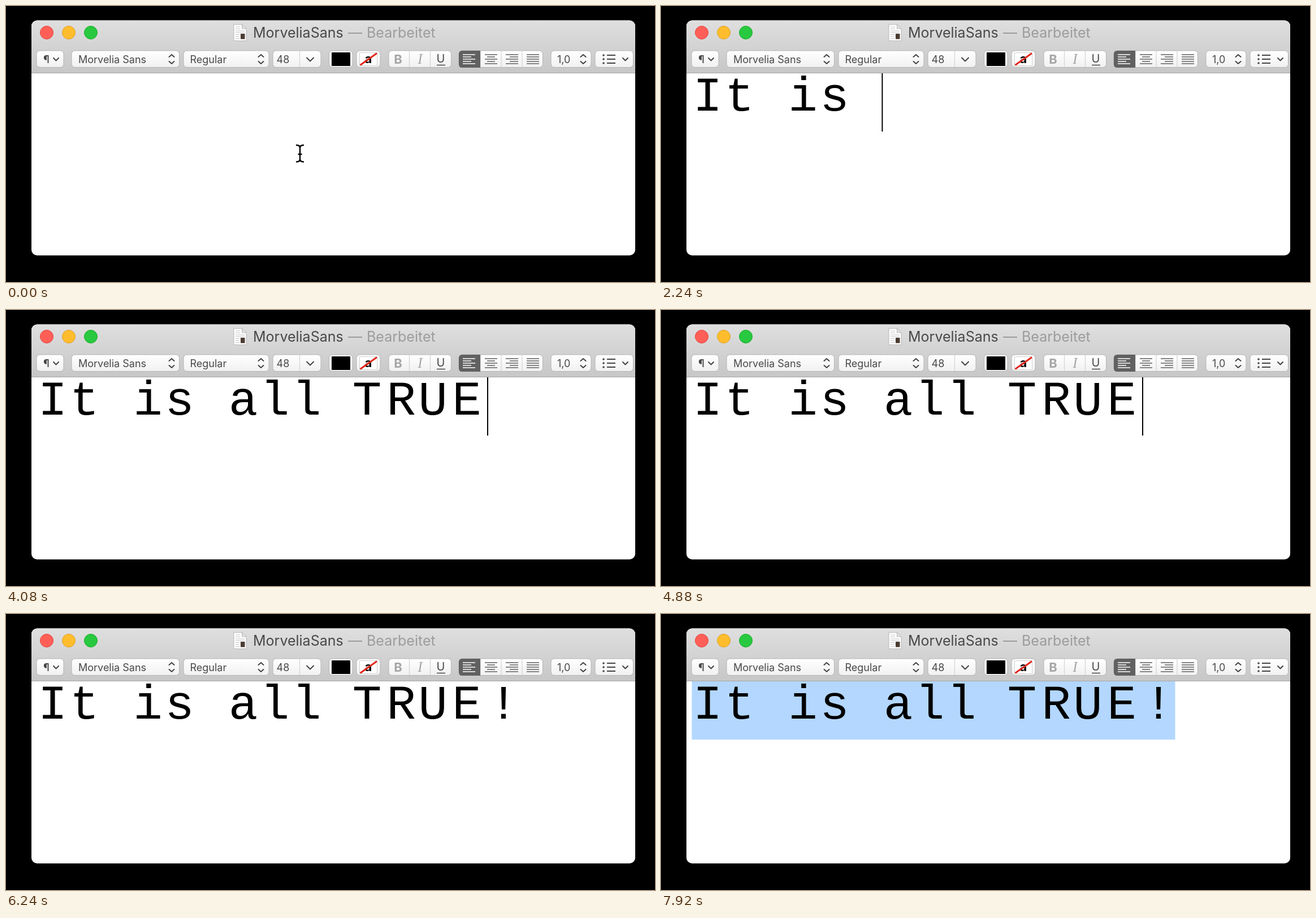
Animation of 1148x488 px, one loop 8 s. Source, as an HTML page:

```html
<!DOCTYPE html>
<html lang="de">
<head>
<meta charset="utf-8">
<title>Typing in a text editor</title>
<style>
  html, body { margin: 0; width: 100%; height: 100%; overflow: hidden; background: #000; }
  svg { display: block; width: 100%; height: 100%; }
  text { font-family: Inter, sans-serif; font-size: 18px; fill: #484848; }
  .title { font-size: 25px; }
  .line { fill: none; stroke-linecap: round; stroke-linejoin: round; stroke: #444; stroke-width: 2; }
  .divider { stroke: #d2d2d2; stroke-width: 1.2; }
  #typed text { font: 86px "Liberation Mono", monospace; text-anchor: middle; fill: #000; }
</style>
</head>
<body>
<svg viewBox="0 0 1148 488">
  <defs>
    <linearGradient id="bar" x2="0" y2="1">
      <stop stop-color="#e0dfe0"/><stop offset="1" stop-color="#c8c7c8"/>
    </linearGradient>
    <linearGradient id="face" x2="0" y2="1">
      <stop stop-color="#fff"/><stop offset="1" stop-color="#f1f1f1"/>
    </linearGradient>
    <clipPath id="window"><rect x="45" y="25.5" width="1068" height="415.5" rx="10"/></clipPath>
  </defs>

  <g clip-path="url(#window)">
    <rect x="45" y="25" width="1068" height="417" fill="#fff"/>
    <rect x="45" y="25" width="1068" height="93" fill="url(#bar)"/>
    <path d="M45 118.5H1113" stroke="#a6a6a6" stroke-width="1"/>
  </g>

  <g stroke-width="1">
    <circle cx="72" cy="47" r="11.5" fill="#ff5f57" stroke="#e2483f"/>
    <circle cx="111" cy="47" r="11.5" fill="#ffbd2e" stroke="#dfa023"/>
    <circle cx="150" cy="47" r="11.5" fill="#28c940" stroke="#1dad2b"/>
  </g>

  <path d="M403 32.5H417.5L425 40V61.5H403Z" fill="#fff" stroke="#b5b5b5"/>
  <path d="M417.5 32.5V40H425Z" fill="#e4e4e4" stroke="#b5b5b5"/>
  <path d="M406 37H414M406 40.5H414M406 44H422M406 47H422M406 50.5H413M406 54H413M406 57.5H413" stroke="#c4c4c4"/>
  <rect x="415" y="49" width="7.5" height="9.5" fill="#4c3c32"/>

  <text class="title" x="437" y="56" fill="#444">MorveliaSans</text>
  <text class="title" x="605" y="56" style="fill:#9d9b9d">—</text>
  <text class="title" x="638" y="56" style="fill:#9d9b9d">Bearbeitet</text>

  <g id="buttons"></g>

  <text x="66" y="100.5" style="font-weight:600">¶</text>
  <path class="line" d="M84 92l4.5 4.5 4.5-4.5"/>
  <text x="128" y="100.5">Morvelia Sans</text>
  <text x="325.5" y="100.5">Regular</text>
  <text x="478.5" y="100.5">48</text>
  <path class="line" d="M532 91.5l6 6 6-6"/>
  <text x="975" y="100.5">1,0</text>
  <g id="steppers"></g>

  <rect x="576" y="82" width="33" height="24"/>
  <rect x="625.5" y="82.5" width="31" height="23" fill="#fff" stroke="#d0d0d0"/>
  <text x="641" y="100.5" text-anchor="middle" style="font-size:22px;font-weight:700;fill:#000">a</text>
  <path d="M626.5 104.5L656 83.5" stroke="#e0281b" stroke-width="3"/>

  <text x="693.5" y="102" text-anchor="middle" style="font-size:22px;font-weight:700;fill:#a5a5a5">B</text>
  <text x="732.5" y="102" text-anchor="middle" style="font:italic 25px 'Liberation Serif',serif;fill:#a5a5a5">I</text>
  <text x="769" y="100" text-anchor="middle" style="font-size:20px">U</text>
  <path d="M762 104.5H777" stroke="#444" stroke-width="1.5"/>

  <g id="aligns"></g>

  <path d="M1063 87H1078M1063 94H1078M1063 101H1078" stroke="#444" stroke-width="2"/>
  <path d="M1055 87H1059M1055 94H1059M1055 101H1059M1057 85V89M1057 92V96M1057 99V103" stroke="#444" stroke-width="1.3"/>
  <path class="line" d="M1091 92l4.5 4.5 4.5-4.5"/>

  <rect id="selection" x="54.5" y="119" width="855" height="103" fill="#b3d7ff"/>
  <g id="typed"></g>
  <rect id="caret" y="119" width="2" height="103"/>
  <path id="pointer" class="line" style="stroke:#000;stroke-width:2.4"
    d="M514 246Q520 246 520 251Q520 246 526 246M520 251V271M514 275.5Q520 275.5 520 270.5Q520 275.5 526 275.5M517.5 262H522.5"/>
</svg>

<script>
const el = id => document.getElementById(id);

// Toolbar buttons: left edge, right edge, dividers
const buttons = [
  [54, 102], [116, 306.5], [314, 465], [472, 557, 519.5], [571.5, 613], [620, 662],
  [677, 787.5, 713.5, 750.5], [801, 949.5, 839, 876, 913], [964, 1035], [1042, 1109.5]
];
el('buttons').innerHTML = buttons.map(([left, right, ...dividers]) =>
  `<rect x="${left}" y="79" width="${right - left}" height="29.5" rx="6" fill="url(#face)" stroke="#b4b4b4"/>` +
  dividers.map(x => `<path class="divider" d="M${x} 79.5V108"/>`).join('')
).join('') + '<path d="M839 79H807Q801 79 801 85V103Q801 109 807 109H839Z" fill="#626162"/>';

el('steppers').innerHTML = [293, 451, 1021].map(x =>
  `<path class="line" d="M${x - 4.5} 90l4.5-4 4.5 4M${x - 4.5} 98l4.5 4 4.5-4"/>`
).join('');

// Paragraph alignment icons: centre, share of slack on the left, short line, colour
const aligns = [[819, 0, 15, '#d8d8d8'], [858, .5, 14, '#858585'], [895, 1, 15, '#858585'], [932, 0, 22, '#858585']];
el('aligns').innerHTML = aligns.map(([cx, side, short, color]) => {
  const rows = [22, short, 22, short, 22].map((width, i) =>
    `M${cx - 11 + (22 - width) * side} ${86 + i * 4}h${width}`).join('');
  return `<path d="${rows}" stroke="${color}" stroke-width="1.8"/>`;
}).join('');

const LOOP = 8000, LEFT = 54.5, ADVANCE = 56.15, BLINK = 500;
const FIRST_KEY = 1240, KEY_GAP = 200, BANG = 5480, SELECT = 7840;
const sentence = 'It is all fake';
const swappedCenters = [638.5, 699, 755, 815, 880];

function render(time) {
  let count = Math.floor((time - FIRST_KEY) / KEY_GAP) + 1;
  count = Math.max(0, Math.min(sentence.length, count));
  let lastKey = count ? FIRST_KEY + (count - 1) * KEY_GAP : BLINK;
  let content = sentence.slice(0, count);
  let caretX = LEFT + count * ADVANCE;

  // The finished word is swapped for wider capitals
  const swapped = count === sentence.length;
  if (swapped) {
    content = 'It is all TRUE';
    caretX = 852;
  }
  if (time >= BANG) {
    content += '!';
    caretX = 909;
    lastKey = BANG;
  }

  const center = i => swapped && i >= 10 ? swappedCenters[i - 10] : LEFT + (i + .5) * ADVANCE;
  el('typed').innerHTML = [...content].map((char, i) =>
    char === ' ' ? '' : `<text x="${center(i)}" y="184.5">${char}</text>`).join('');

  const selected = time >= SELECT;
  const caretOn = !selected && Math.floor((time - lastKey) / BLINK) % 2 === 0;
  el('caret').setAttribute('x', caretX - 1);
  el('caret').style.display = caretOn ? '' : 'none';
  el('selection').style.display = selected ? '' : 'none';
  el('pointer').style.display = count ? 'none' : '';
}

function tick() {
  render(performance.now() % LOOP);
  requestAnimationFrame(tick);
}
tick();
</script>
</body>
</html>
```
